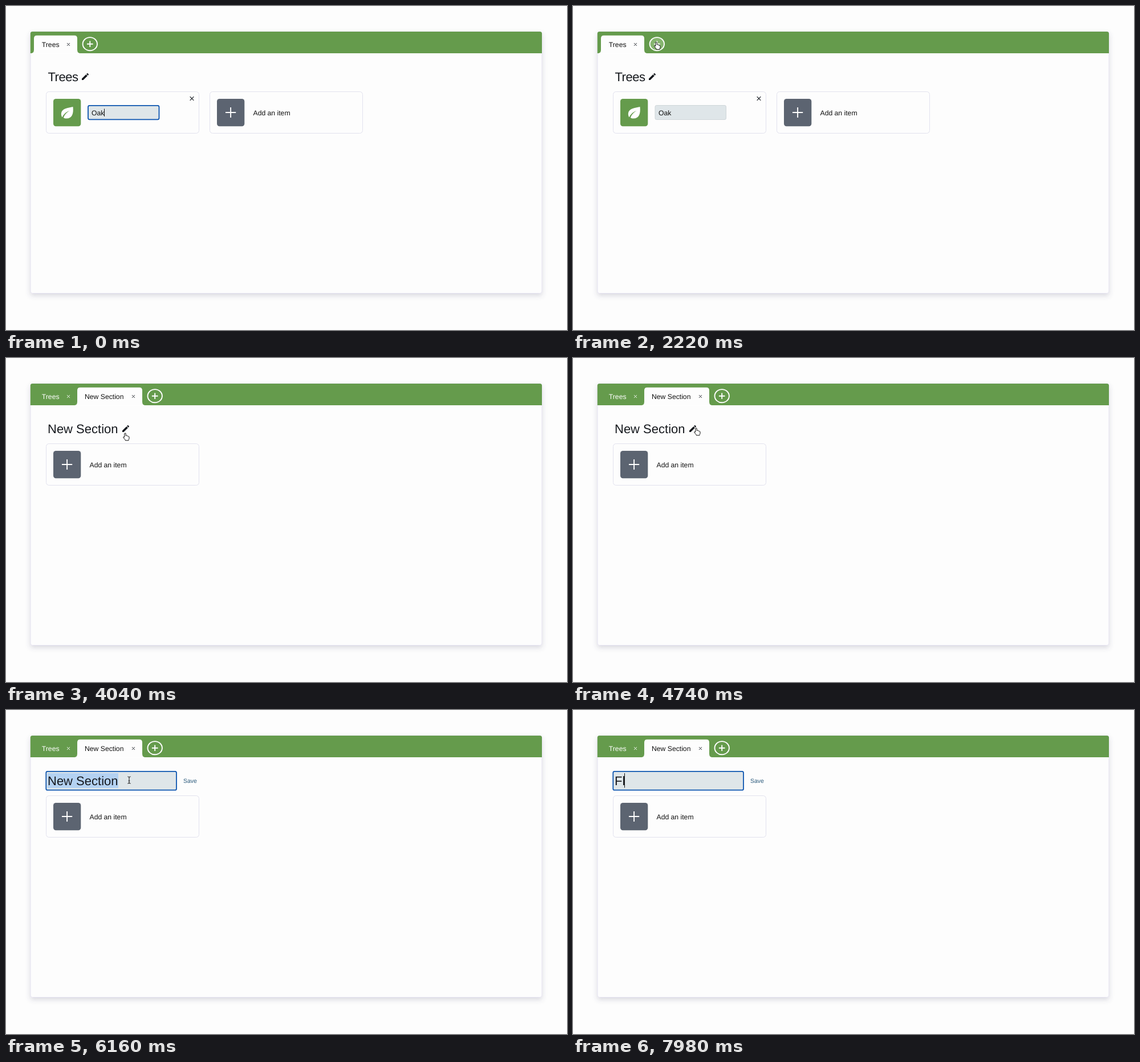
Recreate the animation shown at these times as an HTML page. Size 984 px wide and 569 px high, loop 8000 ms.

```html
<!DOCTYPE html>
<html lang="en">
<head>
<meta charset="utf-8">
<title>Section tabs</title>
<style>
html, body { margin: 0; width: 100%; height: 100%; overflow: hidden; background: #fdfdfd; }
svg { display: block; width: 984px; height: 569px; }
text { font-family: "Liberation Sans", Arial, sans-serif; font-size: 12.2px; fill: #111; white-space: pre; text-rendering: geometricPrecision; }
.title { font-size: 22px; fill: #16191e; }
.light { fill: #fff; }
.save { font-size: 10.5px; fill: #2b5a7c; }
.card { fill: #fdfdfd; stroke: #e2e2ee; }
.field { fill: #dfe6e9; }
.focus { fill: none; stroke: #0d55b0; stroke-width: 1.8; }
.line { fill: none; stroke: #1c2026; stroke-width: 1.2; }
.white { fill: none; stroke: #fff; stroke-width: 1.9; }
.caret { stroke: #111; stroke-width: 1; }
</style>
</head>
<body>
<svg viewBox="0 0 984 569">
  <defs>
    <filter id="shadow" x="-5%" y="-5%" width="110%" height="115%">
      <feDropShadow dx="0" dy="4" stdDeviation="4" flood-color="#50506e" flood-opacity=".2"/>
    </filter>
    <path id="pencil" fill="#14171c" transform="scale(.667)" d="M3 17.25V21h3.75L17.81 9.94l-3.75-3.75zM20.71 7.04a1 1 0 0 0 0-1.41l-2.34-2.34a1 1 0 0 0-1.41 0l-1.83 1.83 3.75 3.75z"/>
    <path id="cross" d="M-3.3-3.3 3.3 3.3M3.3-3.3-3.3 3.3"/>
    <g id="addTab">
      <ellipse class="white" rx="12.7" ry="11.6"/>
      <path class="white" d="M-5.3 0H5.3M0-5.3V5.3"/>
    </g>
    <g id="addCard">
      <rect class="card" x="70.5" y="150.5" width="268" height="73" rx="5"/>
      <rect x="83" y="163" width="48.3" height="48.3" rx="4.5" fill="#5c6471"/>
      <path class="white" stroke-width="2.2" d="M98 187H116.200M107.100 178V196"/>
      <text x="146.500" y="191.500">Add an item</text>
    </g>
  </defs>

  <rect width="984" height="569" fill="#fdfdfd"/>
  <rect x="43" y="45" width="897" height="459.500" rx="3.500" fill="#fdfdfd" stroke="#e4e2f0" filter="url(#shadow)"/>
  <path d="M42.800 83V48.500Q42.800 45 46.300 45H936.500Q940 45 940 48.500V83Z" fill="#659b4c"/>
  <path id="tab" fill="#fdfdfd"/>
  <text id="treesTab" x="62.800" y="72">Trees</text>
  <use id="treesClose" href="#cross" transform="translate(109.500 67.500) scale(.75)"/>

  <g id="trees">
    <ellipse id="hover" cx="147.300" cy="66.700" rx="12.700" ry="11.600" fill="#86b56f"/>
    <use href="#addTab" x="147.300" y="66.700"/>
    <text class="title" x="73.500" y="132.300" letter-spacing="-.5">Trees</text>
    <use href="#pencil" x="131" y="116"/>
    <rect class="card" x="70.500" y="150.500" width="268" height="73" rx="5"/>
    <rect x="83" y="163" width="48.300" height="48.300" rx="4.500" fill="#659b4c"/>
    <path fill="#fff" d="M117.500 177C118.800 189 116 197.600 106 197.600C103.800 197.600 102 197 100.800 196C103 190.500 107 186.500 111.500 183.800C105.500 186 101 190 98.700 195.500C97 193 96.600 190.500 97 188C98.200 180 108 179 117.500 177Z"/>
    <use href="#cross" class="line" x="326" y="162.500"/>
    <rect class="field" x="144" y="174.500" width="124.500" height="25" rx="2.500" stroke="#cfd6d9"/>
    <rect id="itemFocus" class="focus" x="144" y="174.800" width="124.500" height="24.500" rx="2.500"/>
    <text x="150" y="191.500">Oak</text>
    <path id="itemCaret" class="caret" d="M172.500 180.500V194"/>
    <use href="#addCard" x="287"/>
  </g>

  <g id="section">
    <text x="138" y="72">New Section</text>
    <use href="#cross" class="line" transform="translate(223.500 67.500) scale(.75)"/>
    <use href="#addTab" x="261.200" y="66.700"/>
    <use href="#addCard"/>
    <g id="editor">
      <rect class="field" x="70.300" y="107.500" width="228.700" height="33.300" rx="3"/>
      <rect id="titleFocus" class="focus" x="70.300" y="107.800" width="228.700" height="32.900" rx="2.500"/>
      <rect id="selection" x="73" y="111" width="124" height="26" fill="#b4d2f2"/>
      <text class="save" x="311" y="128">Save</text>
    </g>
    <text id="title" class="title" x="73" y="132.300"></text>
    <path id="titleCaret" class="caret" stroke-width="1.200" d="M0 111V136.500"/>
    <use id="sectionPencil" href="#pencil" x="202" y="116"/>
  </g>

  <g id="cursor">
    <circle id="ring" r="12.400" fill="none" stroke="#151515" stroke-width="1.300"/>
    <path id="arrow" d="M0 0V11L2.600 8.700 4.300 12.600 6.200 11.800 4.600 8H8Z" fill="#111" stroke="#fff" stroke-width=".8"/>
    <path id="hand" fill="#fff" stroke="#111" stroke-width="1" stroke-linejoin="round" d="M-1.200 7.200V1Q-1.200 0 0 0T1.200 1V4.600Q1.500 3.900 2.500 4.100 3.300 4.300 3.300 5 4 4.400 4.800 4.900 5.300 5.200 5.300 5.800 6.800 5.300 7 6.800V9Q7 10.500 6 11.700V12.800H.200V11.800L-3 8Q-3.700 6.700-2.700 6.300-2 6.200-1.200 7.200Z"/>
    <path id="beam" fill="none" stroke="#222" stroke-width="1.100" d="M-2.700-6Q-.500-6 0-4.700Q.500-6 2.700-6M0-5V5M-2.700 6Q-.500 6 0 4.700Q.500 6 2.700 6M-1.400 1.500H1.400"/>
  </g>
</svg>
<script>
const LOOP = 8000, BLINK = 1060;
const ui = {};
document.querySelectorAll("svg [id]").forEach(el => ui[el.id] = el);

const T = {
  appear: 840, hover: 1280, blur: 2080, section: 2280, pencil: 3960,
  edit: 4960, focus: 5520, select: 5760, clear: 6400, first: 7340, second: 7700
};
const clicks = [2040, 4800, 5430, 5680];
const path = [
  [840, 172, 84], [1000, 152, 50], [1500, 146, 63.500], [2900, 146, 63.500],
  [4040, 209, 132], [4440, 216, 123]
];

const show = (el, on) => el.style.display = on ? "" : "none";
const within = (t, a, b) => t >= a && t < b;
const ease = p => p * p * (3 - 2 * p);
const blinkOn = t => t % BLINK < BLINK / 2;

function cursorAt(t) {
  let a = path[0];
  for (const b of path) {
    if (t < b[0]) {
      const p = ease(Math.max(0, (t - a[0]) / (b[0] - a[0] || 1)));
      return [a[1] + (b[1] - a[1]) * p, a[2] + (b[2] - a[2]) * p];
    }
    a = b;
  }
  return [a[1], a[2]];
}

function tabShape(l, r) {
  return `M${l - 6} 83.200Q${l} 83.200 ${l} 77V57Q${l} 51.700 ${l + 5} 51.700H${r - 5}` +
    `Q${r} 51.700 ${r} 57V77Q${r} 83.200 ${r + 6} 83.200Z`;
}

function titleAt(t) {
  if (t < T.clear) return "New Section";
  return t < T.first ? "" : t < T.second ? "F" : "Fl";
}

function drawCursor(t) {
  const [x, y] = cursorAt(t);
  const beam = t >= T.edit;
  const hand = within(t, T.hover, T.section) || within(t, T.pencil, T.edit);
  show(ui.cursor, within(t, T.appear, T.first));
  ui.cursor.setAttribute("transform", `translate(${x} ${y})`);
  show(ui.arrow, !hand && !beam);
  show(ui.hand, hand);
  show(ui.beam, beam);
  show(ui.ring, clicks.some(c => within(t, c, c + 150)));
}

function draw(t) {
  const added = t >= T.section, editing = t >= T.edit;
  show(ui.trees, !added);
  show(ui.section, added);
  ui.tab.setAttribute("d", added ? tabShape(125, 239) : tabShape(49, 125));
  ui.treesTab.setAttribute("class", added ? "light" : "");
  ui.treesClose.setAttribute("stroke", added ? "#fff" : "#1c2026");
  ui.treesClose.setAttribute("stroke-width", 1.2);

  show(ui.hover, t >= T.hover);
  show(ui.itemFocus, t < T.blur);
  show(ui.itemCaret, t < T.blur && blinkOn(t));

  show(ui.editor, editing);
  show(ui.sectionPencil, !editing);
  show(ui.titleFocus, t >= T.focus);
  show(ui.selection, within(t, T.select, T.clear));
  const title = titleAt(t);
  ui.title.textContent = title;

  const since = [T.second, T.first, T.clear].find(s => t >= s);
  const x = title === "Fl" ? 90.5 : title === "F" ? 86.2 : 73.5;
  show(ui.titleCaret, since !== undefined && blinkOn(t - since));
  ui.titleCaret.setAttribute("transform", `translate(${x} 0)`);

  drawCursor(t);
}

const start = performance.now();
function tick() {
  draw((performance.now() - start) % LOOP);
  requestAnimationFrame(tick);
}
draw(0);
requestAnimationFrame(tick);
</script>
</body>
</html>
```
